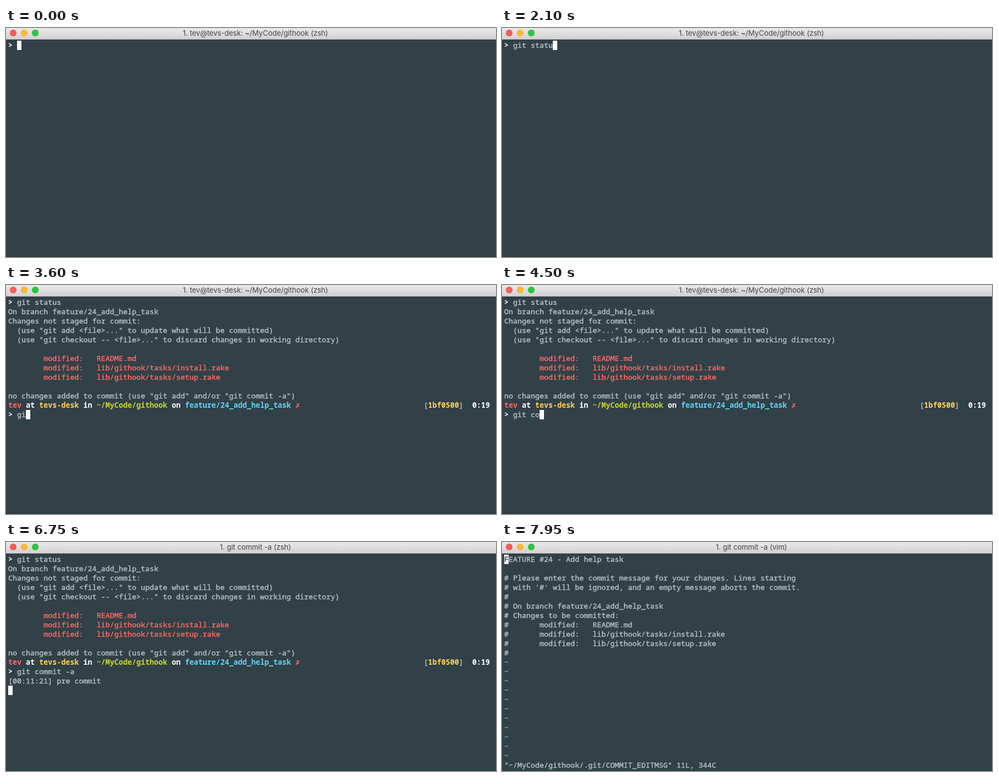
Recreate the animation shown at these times as an HTML page with a canvas. Size 887 by 416 pixels, loop 8 s.

```html
<!DOCTYPE html>
<html lang="en">
<head>
<meta charset="utf-8">
<title>Terminal</title>
<style>
html, body { margin: 0; width: 100%; height: 100%; overflow: hidden; background: #324047; }
canvas { display: block; }
</style>
</head>
<body>
<canvas id="stage" width="887" height="416"></canvas>
<script>
const ctx = document.getElementById("stage").getContext("2d");
const LOOP = 8000, CELL = 8, ROW = 17, LEFT = 4, TOP = 23;
const BG = "#324047", GREY = "#b0bec5", WHITE = "#ffffff", RED = "#ff6862",
  YELLOW = "#ffd254", GREEN = "#c9d923", CYAN = "#5ed7f8", BLUE = "#4ab8f0";
const BRANCH = "feature/24_add_help_task";
const FILES = ["README.md", "lib/githook/tasks/install.rake", "lib/githook/tasks/setup.rake"];
const MODIFIED = FILES.map(file => "modified:   " + file);

// Pairs of time and number of characters typed so far.
const STATUS = [[750, 1], [900, 2], [1050, 3], [1350, 5], [1500, 6],
  [1800, 7], [1950, 8], [2100, 9], [2250, 10]];
const COMMIT = [[3600, 2], [3750, 3], [4200, 4], [4350, 5], [4500, 6], [4800, 7],
  [5100, 8], [5250, 9], [5400, 10], [5550, 11], [5850, 12], [6000, 13]];
const STATUS_DONE = 2400, COMMIT_RUN = 6450, HOOK_LOG = 6750,
  HOOK_TITLE = 7050, EDITOR = 7200, EDITOR_TITLE = 7950;

function put(row, col, text, color = GREY, bold = false) {
  const x = LEFT + col * CELL, y = TOP + row * ROW + 13;
  ctx.font = `${bold ? "bold " : ""}13.3333px "Noto Sans Mono", "DejaVu Sans Mono", monospace`;
  ctx.fillStyle = ctx.strokeStyle = color;
  ctx.fillText(text, x, y);
  if (bold) return;
  // A thin outline brings the regular face up to medium weight.
  ctx.lineWidth = 0.45;
  ctx.lineJoin = "round";
  ctx.strokeText(text, x, y);
}

function cursor(row, col) {
  ctx.fillStyle = WHITE;
  ctx.fillRect(LEFT + col * CELL, TOP + row * ROW, CELL, ROW);
}

function command(row, text, keys, t, active) {
  const count = keys.reduce((n, [at, typed]) => t >= at ? typed : n, 0);
  put(row, 0, ">", WHITE, true);
  put(row, 2, text.slice(0, count));
  if (active) cursor(row, 2 + count);
}

function disc(x, y, radius, color) {
  ctx.beginPath();
  ctx.arc(x, y, radius, 0, 7);
  ctx.fillStyle = color;
  ctx.fill();
}

function titleBar(title) {
  const shade = ctx.createLinearGradient(0, 0, 0, 20);
  shade.addColorStop(0, "#e9e9e9");
  shade.addColorStop(1, "#d2d2d2");
  ctx.fillStyle = shade;
  ctx.fillRect(0, 0, 887, 20);
  ctx.fillStyle = "#b4b6b7";
  ctx.fillRect(0, 20, 887, 1);
  [["#e2463f", "#fc5b57"], ["#e1a325", "#fdbc2f"], ["#1fac2f", "#28c83c"]]
    .forEach(([rim, color], i) => {
      disc(13 + i * 20, 9, 6, rim);
      disc(13 + i * 20, 9, 5.4, color);
    });
  ctx.font = "13px Inter, Roboto, sans-serif";
  ctx.fillStyle = "#444444";
  ctx.textAlign = "center";
  ctx.fillText(title, 451.5, 14);
  ctx.textAlign = "left";
}

function statusOutput() {
  put(1, 0, "On branch " + BRANCH);
  put(2, 0, "Changes not staged for commit:");
  put(3, 2, '(use "git add <file>..." to update what will be committed)');
  put(4, 2, '(use "git checkout -- <file>..." to discard changes in working directory)');
  MODIFIED.forEach((line, i) => put(6 + i, 8, line, RED));
  put(10, 0, 'no changes added to commit (use "git add" and/or "git commit -a")');
  [[0, "tev", RED], [4, "at", WHITE], [7, "tevs-desk", YELLOW], [17, "in", WHITE],
    [20, "~/MyCode/githook", GREEN], [37, "on", WHITE], [40, BRANCH, CYAN],
    [95, "1bf0500", YELLOW], [105, "0:19", WHITE]
  ].forEach(([col, text, color]) => put(11, col, text, color, true));
  put(11, 65, "✗", RED);
  put(11, 94, "[");
  put(11, 102, "]");
}

function shell(t) {
  command(0, "git status", STATUS, t, t < STATUS_DONE);
  if (t < STATUS_DONE) return;
  statusOutput();
  command(12, "git commit -a", COMMIT, t, t < COMMIT_RUN);
  if (t < COMMIT_RUN) return;
  const logged = t >= HOOK_LOG;
  if (logged) put(13, 0, "[00:11:21] pre commit");
  cursor(logged ? 14 : 13, 0);
}

function editor() {
  put(0, 1, "EATURE #24 - Add help task");
  cursor(0, 0);
  put(0, 0, "F", BG);
  ["# Please enter the commit message for your changes. Lines starting",
    "# with '#' will be ignored, and an empty message aborts the commit.",
    "#",
    "# On branch " + BRANCH,
    "# Changes to be committed:",
    ...MODIFIED.map(line => "#       " + line),
    "#"
  ].forEach((line, i) => put(2 + i, 0, line));
  for (let row = 11; row < 22; row++) put(row, 0, "~", BLUE);
  put(22, 0, '"~/MyCode/githook/.git/COMMIT_EDITMSG" 11L, 344C');
}

function titleAt(t) {
  if (t < COMMIT_RUN) return "1. tev@tevs-desk: ~/MyCode/githook (zsh)";
  const job = t < HOOK_TITLE ? "zsh" : t < EDITOR_TITLE ? "ruby" : "vim";
  return `1. git commit -a (${job})`;
}

function draw() {
  const t = performance.now() % LOOP;
  ctx.fillStyle = BG;
  ctx.fillRect(0, 0, 887, 416);
  ctx.fillStyle = "#2b373d";
  ctx.fillRect(0, 415, 887, 1);
  titleBar(titleAt(t));
  if (t < EDITOR) shell(t);
  else editor();
  requestAnimationFrame(draw);
}
draw();
</script>
</body>
</html>
```
